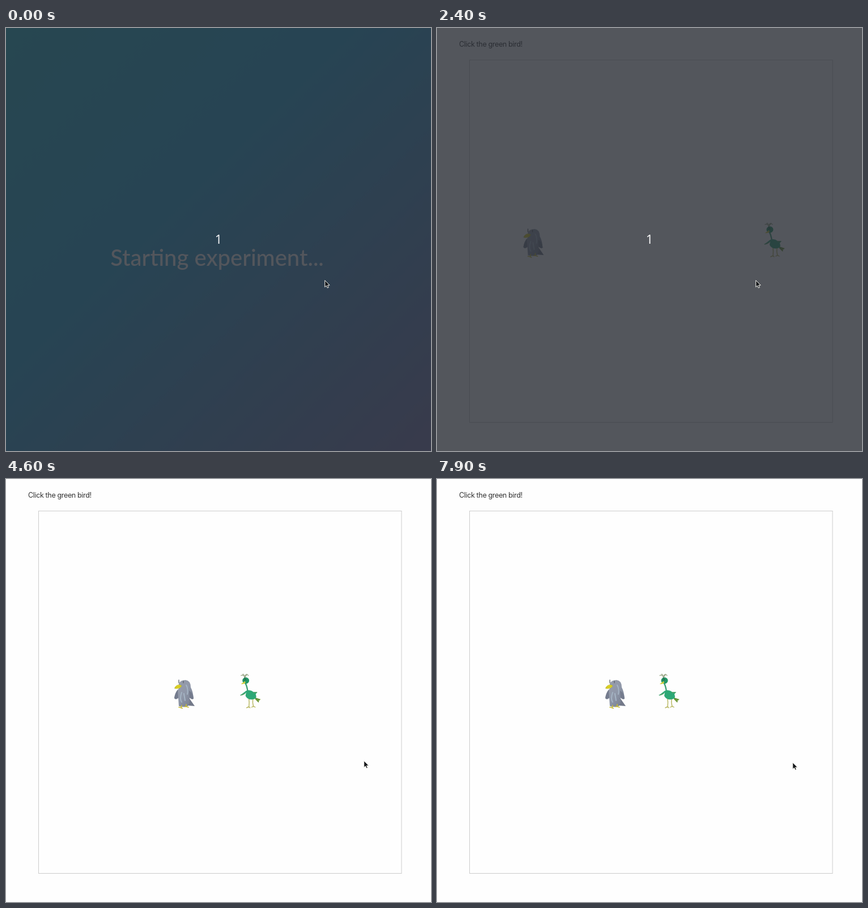
Write an HTML page that moves like this. It is 750 px wide and 747 px high and loops after 8000 ms.

```html
<!DOCTYPE html>
<html lang="en">
<head>
<meta charset="utf-8">
<title>Click the green bird</title>
<style>
  html, body { margin: 0; width: 100%; height: 100%; overflow: hidden; background: #fefefe; }
  svg { display: block; width: 100%; height: 100%; }
</style>
</head>
<body>
<svg viewBox="0 0 750 747">
  <defs>
    <linearGradient id="sky" gradientUnits="userSpaceOnUse" x1="0" y1="0" x2="748" y2="748">
      <stop offset="0" stop-color="#23b4c8"/>
      <stop offset=".4" stop-color="#23a6d5"/>
      <stop offset="1" stop-color="#7b76ae"/>
    </linearGradient>
    <linearGradient id="plumage" x1="0" y1="0" x2="1" y2="1">
      <stop offset="0" stop-color="#9a9eab"/>
      <stop offset=".5" stop-color="#9098a9"/>
      <stop offset="1" stop-color="#737a8c"/>
    </linearGradient>
  </defs>

  <g id="intro">
    <rect width="750" height="747" fill="url(#sky)"/>
    <text x="372.5" y="420" text-anchor="middle" font-family="Lato, sans-serif" font-size="40" font-weight="500" fill="#fff">Starting experiment...</text>
  </g>

  <g id="task">
    <rect width="750" height="747" fill="#fefefe"/>
    <text x="39" y="32.5" font-family="Inter, sans-serif" font-size="12.5" letter-spacing="-.35" fill="#333">Click the green bird!</text>
    <rect x="57.5" y="56.5" width="640.5" height="640" fill="none" stroke="#ccc"/>

    <g id="grey" stroke-linecap="round" stroke-linejoin="round">
      <path d="M28 45 L37 58 L24 57Z" fill="#737989"/>
      <path d="M9 18 Q12 12 21 12 Q30 13 30 25 Q34 32 35 45 Q32 47 28 43 Q29 53 25 58 Q16 61 9 58 L8 44 Q3 48 1 44 Q3 33 9 27Z" fill="url(#plumage)"/>
      <path d="M7 29 Q2 35 1 44 Q4 47 8 43Z M27 31 Q34 34 35 45 Q31 47 28 43Z" fill="#747b8d"/>
      <path d="M14 34 Q10 45 14 51 M18 36 L20 48 M22 21 Q26 28 24 37" fill="none" stroke="#a5b4c4" stroke-width="2"/>
      <path d="M9 12 V17 M17 14 V17" stroke="#59606b" stroke-width="1.3"/>
      <path d="M2 25 Q7 18 14 22 Q12 28 2 27Z" fill="#e8dc22" stroke="#aaa52f" stroke-width=".6"/>
      <path d="M3 25 L12 23" stroke="#9d952d" stroke-width=".6"/>
      <path d="M14 57 L13 61 L9 60 M13 61 L15 62 M22 55 L22 59 L19 59 M22 59 L26 60" fill="none" stroke="#c9bd35" stroke-width="1.7"/>
    </g>

    <g id="green" stroke-linecap="round" stroke-linejoin="round">
      <path d="M9 8 Q7 2 2 4 M9 8 Q7 0 5 2 M9 8 Q12 0 15 4 M9 7 Q9 2 13 2" fill="none" stroke="#9da98a" stroke-width="1.3"/>
      <path d="M10 18 Q13 24 14 33" fill="none" stroke="#3f9f75" stroke-width="2.4"/>
      <ellipse cx="10.5" cy="13" rx="6" ry="5.8" fill="#229765"/>
      <path d="M8 8 L11 12 M7 12 H9" stroke="#2b5947" stroke-width="1.2"/>
      <path d="M2 19 L9 14 L10 17 Q6 20 2 19Z" fill="#d5cf3c"/>
      <path d="M16 44 Q17 52 16 60 M23 45 Q22 52 24 59 M12 61 L16 59 L18 61 M21 60 L24 58 L27 60" fill="none" stroke="#b9b863" stroke-width="1.5"/>
      <path d="M27 43 L37 46 L34 48 L33 52 L27 46Z" fill="#86a53f"/>
      <path d="M28 44 L35 47 M28 45 L33 50" stroke="#40843c"/>
      <path d="M11 34 Q7 40 0 39 Q5 36 11 31 Q18 28 24 33 L31 33 L28 37 Q31 45 24 46 Q14 48 10 40Z" fill="#2da876"/>
      <path d="M2 39 L9 36 M24 34 L30 34" stroke="#789f62"/>
    </g>
  </g>

  <g id="pause">
    <rect width="750" height="747" fill="#282c34" fill-opacity=".8"/>
    <text x="375" y="381" text-anchor="middle" font-family="'Open Sans', sans-serif" font-size="22" fill="#fff">1</text>
  </g>

  <path id="cursor" d="M.7 .7 V12.5 L3.4 10 L5.2 14 L7.3 13.1 L5.5 9.2 H9.2Z" fill="#16181b" stroke="#f4f4ee" stroke-width="1"/>
</svg>
<script>
const LOOP = 8000, STEP = 100;
const START = 1890, GREY_MS = 2000, GREEN_MS = 3000, DIP_START = 5890, DIP_MS = 1000;
// Spans in which the screen stutters and keeps its last picture.
const HOLDS = [[3300, 3600], [3600, 3800], [4300, 4600], [6300, 6500], [7300, 7500]];
const CURSOR = [[3900, 562, 445], [4300, 599, 465], [4600, 631, 497], [4900, 628, 500], [5200, 628, 500], [5400, 627, 500]];

const $ = id => document.getElementById(id);
const clamp = v => Math.min(1, Math.max(0, v));
const mix = (a, b, p) => a + (b - a) * clamp(p);
const show = (id, on) => $(id).setAttribute('display', on ? 'inline' : 'none');
const place = (id, x, y) => $(id).setAttribute('transform', `translate(${x} ${y})`);

function shownTime(ms) {
  const t = Math.floor(ms / STEP) * STEP;
  const hold = HOLDS.find(([from, to]) => t >= from && t < to);
  return hold ? hold[0] : t;
}

function cursorAt(t) {
  const next = CURSOR.findIndex(([time]) => time > t);
  if (next <= 0) return CURSOR.at(next).slice(1);
  const [t0, x0, y0] = CURSOR[next - 1], [t1, x1, y1] = CURSOR[next];
  const p = (t - t0) / (t1 - t0);
  return [mix(x0, x1, p), mix(y0, y1, p)];
}

function draw(ms) {
  const t = shownTime(ms);
  show('intro', t < 1100);
  show('task', t >= 1100);
  show('pause', t < 3600);
  show('grey', t >= 2000);
  show('green', t >= 2000);

  const walked = t < 2100 ? 0 : t - START;
  const dip = 13 * clamp(1 - Math.abs((t - DIP_START) / DIP_MS - 1));
  place('grey', mix(102, 296, walked / GREY_MS), 343 + dip);
  place('green', mix(615, 391, walked / GREEN_MS), 343 + dip);
  place('cursor', ...cursorAt(t));
}

const begin = performance.now();
function tick() {
  draw((performance.now() - begin) % LOOP);
  requestAnimationFrame(tick);
}
tick();
</script>
</body>
</html>
```
